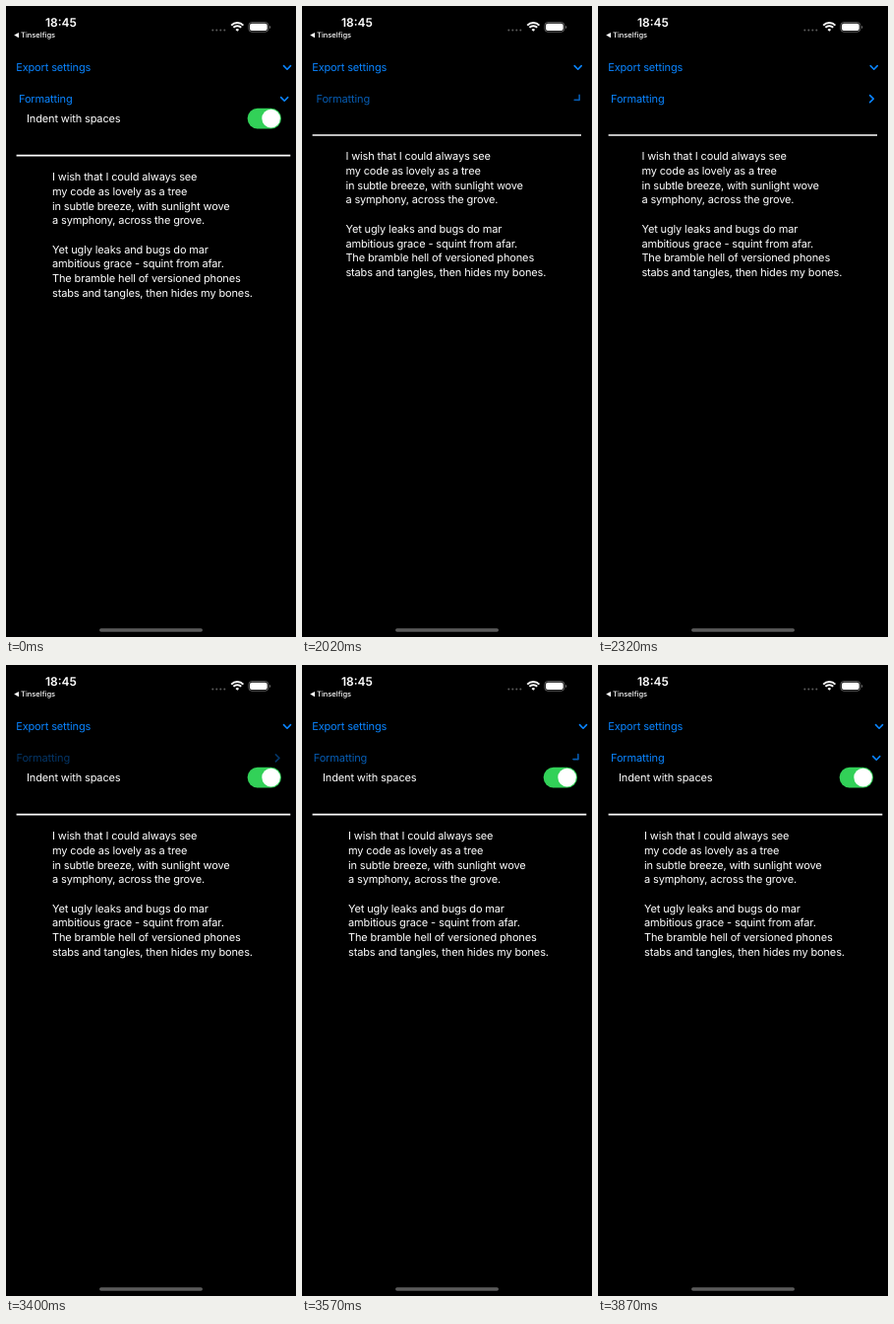
Write an HTML page that moves like this. It is 295 px wide and 640 px high and loops after 5.06 s.

```html
<!DOCTYPE html>
<html lang="en">
<head>
<meta charset="utf-8">
<style>
html, body { margin: 0; height: 100%; overflow: hidden; background: #000; }
svg { display: block; width: 295px; height: 640px; }
text { font: 11px Inter, "Open Sans", sans-serif; letter-spacing: -.14px; fill: #fff; text-rendering: geometricPrecision; }
.blue { fill: #0a84ff; }
.clock { font-size: 12px; font-weight: 600; letter-spacing: 0; text-anchor: middle; }
.back { font-size: 7.5px; font-weight: 500; letter-spacing: 0; }
.chevron { fill: none; stroke: #0a84ff; stroke-width: 1.6; stroke-linecap: round; stroke-linejoin: round; vector-effect: non-scaling-stroke; }
</style>
</head>
<body>
<svg viewBox="0 0 295 640">
  <defs><path id="chevron" class="chevron" d="M-1.8-3.5L1.8 0L-1.8 3.5"/></defs>

  <text class="clock" x="56" y="21.2">18:45</text>
  <path d="M8.2 29.6L13 27V32.2Z" fill="#fff"/>
  <text class="back" x="15" y="32.2">Tinselfigs</text>
  <path d="M210.3 24.5h13" stroke="#5c5c5c" stroke-width="2" stroke-linecap="round" stroke-dasharray="0 4"/>
  <g fill="none" stroke="#fff" stroke-width="2">
    <path d="M229.2 19.6a8.6 8.6 0 0 1 12.2 0M231.4 21.8a5.5 5.5 0 0 1 7.8 0"/>
    <path d="M235.3 25.8l-1.8-1.9a2.6 2.6 0 0 1 3.6 0z" fill="#fff" stroke="none"/>
  </g>
  <rect x="246.9" y="16.6" width="19.9" height="9.6" rx="3" fill="none" stroke="#777" stroke-width=".8"/>
  <rect x="248" y="17.7" width="17.7" height="7.4" rx="2" fill="#fff"/>
  <path d="M268.1 19.9a1.6 1.6 0 0 1 0 3z" fill="#777"/>

  <text class="blue" x="10.2" y="66">Export settings</text>
  <use id="exportChevron" href="#chevron"/>
  <text id="label" class="blue" y="98.2">Formatting</text>
  <use id="labelChevron" href="#chevron"/>

  <g id="option">
    <text x="21" y="118.2">Indent with spaces</text>
    <rect x="245.6" y="103.7" width="34.4" height="20.8" rx="10.4" fill="#32d158"/>
    <circle cx="269.6" cy="114.1" r="9.3" fill="#fff"/>
  </g>
  <path id="divider" stroke="#fff" stroke-width="1.6"/>
  <g id="poem"></g>

  <rect x="95" y="631.2" width="105" height="3.6" rx="1.8" fill="#5a5a5a"/>
</svg>
<script>
const LOOP = 5060;
const CLOSE = { start: 1870, steps: [0, 80, 150, 240, 310, 380, 450] };
const OPEN = { start: 3400, steps: [0, 80, 170, 240, 320, 400, 470] };
const LINES = [
  "I wish that I could always see",
  "my code as lovely as a tree",
  "in subtle breeze, with sunlight wove",
  "a symphony, across the grove.",
  "",
  "Yet ugly leaks and bugs do mar",
  "ambitious grace - squint from afar.",
  "The bramble hell of versioned phones",
  "stabs and tangles, then hides my bones."
];
const el = id => document.getElementById(id);
const set = (id, attrs) => {
  for (const name in attrs) el(id).setAttribute(name, attrs[name]);
};
const place = (x, y, angle, scale = 1) =>
  `translate(${x} ${y}) rotate(${angle}) scale(${scale})`;

el("poem").innerHTML = LINES.map((line, i) =>
  `<text y="${i * 14.7}">${line}</text>`).join("");

function draw(time) {
  const t = time % LOOP;
  const closed = t >= CLOSE.start && t < OPEN.start;
  const phase = closed ? CLOSE : OPEN;
  const elapsed = (t < CLOSE.start ? t + LOOP : t) - phase.start;
  const step = phase.steps.filter(s => s <= elapsed).length - 1;
  const rest = (1 - step / 6) ** 1.7; // part of the transition still to go
  const opacity = 1 - .6 * rest;

  set("option", { visibility: closed ? "hidden" : "visible" });
  set("exportChevron", { transform: place(closed ? 280.7 : 286, 62.4, 90) });
  set("divider", { d: closed ? "M10.6 131H284" : "M10.6 151.6H289.3" });
  set("poem", { transform: closed ? "translate(44.4 156.4)" : "translate(47 177.2)" });
  set("label", { x: 13 + (closed ? 3 : -2.5) * rest, opacity });
  set("labelChevron", {
    opacity,
    transform: closed
      ? place(278.4 + 5 * rest, 94.1, 90 * rest, step ? 1 : .2)
      : place(283.2 - 7 * rest, 94.4, 90 * (1 - rest))
  });
}

function tick() {
  draw(performance.now());
  requestAnimationFrame(tick);
}
tick();
</script>
</body>
</html>
```
